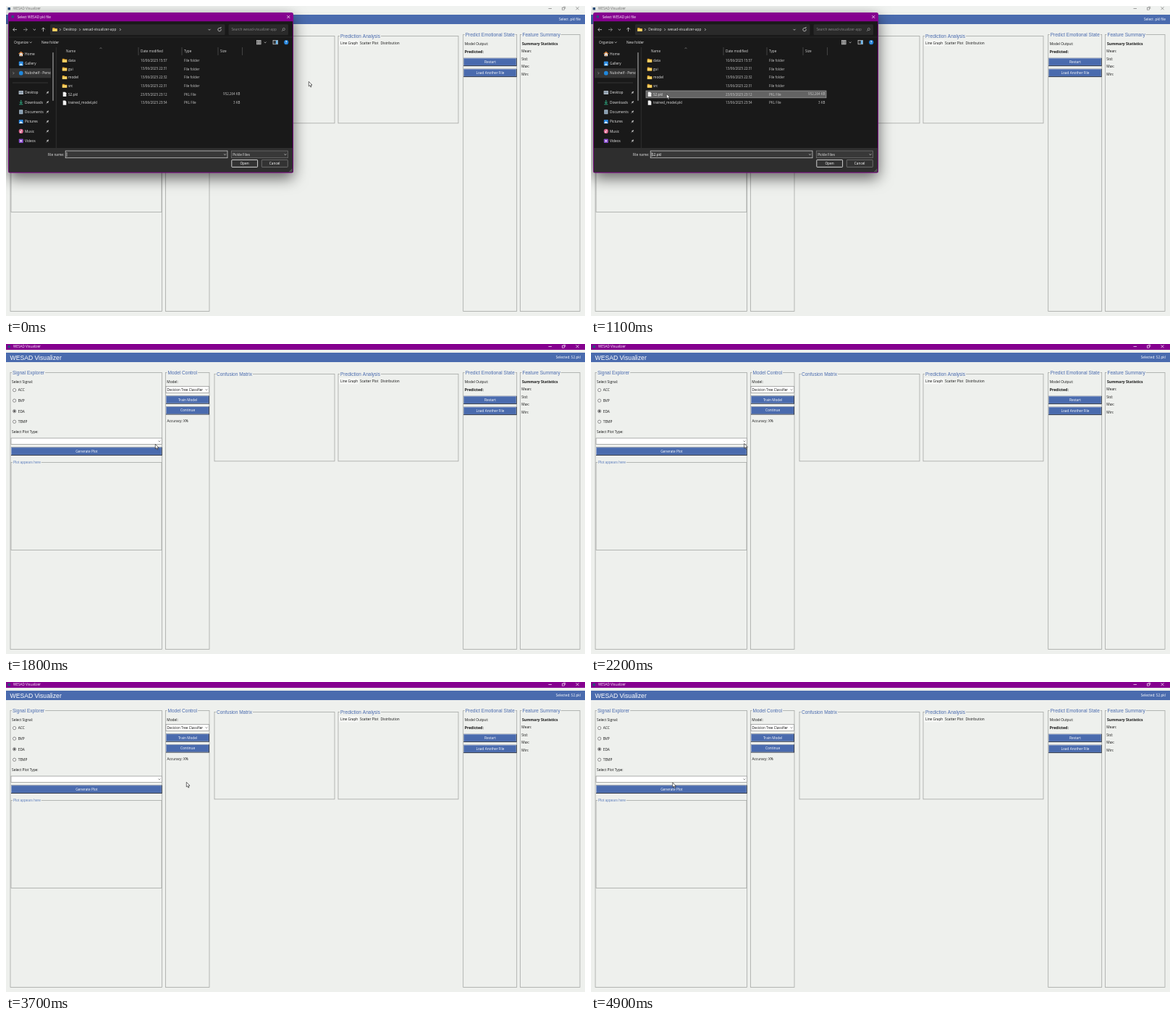
Animation, 800 px wide and 428 px high, one loop 5000 ms. Source, as an HTML page with a canvas:

```html
<!DOCTYPE html>
<html lang="en">
<head>
<meta charset="utf-8">
<style>
html, body { margin: 0; width: 100%; height: 100%; overflow: hidden; background: #eef0ed; }
canvas { display: block; width: 800px; height: 428px; }
</style>
</head>
<body>
<canvas width="800" height="428"></canvas>
<script>
const c = document.querySelector('canvas').getContext('2d');
const UI = '"Open Sans", sans-serif', ARIAL = '"Liberation Sans", Arial, sans-serif';
const BLUE = '#4a6bae', PURPLE = '#85008f', BG = '#eef0ed', INK = '#111';
const LOOP = 5000, STEP = 100, CLOSE_AT = 1200, HOVER_AT = 600, PICK_AT = 800, LOADED_AT = 1500;

// time, x, y of the pointer tip
const path = [[0, 418, 104], [100, 414, 104], [700, 108, 121], [1100, 104, 121], [1200, 109, 122],
  [1800, 206, 138], [2300, 212, 137], [2900, 240, 140], [3700, 249, 138],
  [4200, 160, 125], [4500, 90, 122], [4800, 110, 127], [4900, 112.5, 138.5]];

function box(x, y, w, h, fill, edge, lw = 0.7) {
  if (fill) { c.fillStyle = fill; c.fillRect(x, y, w, h); }
  if (edge) { c.strokeStyle = edge; c.lineWidth = lw; c.strokeRect(x, y, w, h); }
}
function round(x, y, w, h, r, fill, edge, lw = 0.7) {
  c.beginPath();
  c.roundRect(x, y, w, h, r);
  if (fill) { c.fillStyle = fill; c.fill(); }
  if (edge) { c.strokeStyle = edge; c.lineWidth = lw; c.stroke(); }
}
function dot(x, y, r, fill, edge) {
  c.beginPath();
  c.arc(x, y, r, 0, 7);
  if (fill) { c.fillStyle = fill; c.fill(); }
  if (edge) { c.strokeStyle = edge; c.lineWidth = 0.6; c.stroke(); }
}
function line(color, lw, ...p) {
  c.beginPath();
  for (let i = 0; i < p.length; i += 2) c.lineTo(p[i], p[i + 1]);
  c.strokeStyle = color; c.lineWidth = lw; c.stroke();
}
function shape(fill, ...p) {
  c.beginPath();
  for (let i = 0; i < p.length; i += 2) c.lineTo(p[i], p[i + 1]);
  c.closePath(); c.fillStyle = fill; c.fill();
}
// y is the middle of the text line
function text(s, x, y, color = INK, size = 4.85, align = 'left', font = UI, weight = '') {
  c.font = `${weight} ${size}px ${font}`;
  c.textAlign = align; c.fillStyle = color;
  c.fillText(s, x, y + size * 0.35);
}
const down = (x, y, color, r = 1.5) => line(color, 0.7, x - r, y - r / 2, x, y + r / 2, x + r, y - r / 2);
const right = (x, y, color) => line(color, 0.7, x - 0.7, y - 1.5, x + 0.8, y, x - 0.7, y + 1.5);
function cross(x, y, color) {
  line(color, 0.7, x - 2, y - 2, x + 2, y + 2);
  line(color, 0.7, x + 2, y - 2, x - 2, y + 2);
}
function group(title, x, y, w, h, size = 6.53, color = BLUE) {
  box(x, y, w, h, null, '#a5a7a5', 0.8);
  c.font = `${size}px ${ARIAL}`;
  box(x + 2, y - 2, c.measureText(title).width + 2, 4, BG);
  text(title, x + 3, y + 0.3, color, size, 'left', ARIAL);
}
function button(label, x, y, w, h) {
  box(x, y, w, h, '#1c2433');
  box(x, y, w - 0.8, h - 0.9, '#a9b8d6');
  box(x + 0.7, y + 0.7, w - 1.8, h - 1.9, BLUE);
  text(label, x + w / 2, y + h / 2 - 0.2, '#fff', 4.75, 'center');
}
function combo(value, x, y, w, h) {
  box(x, y, w, h, '#fff', '#8c8e8c');
  text(value, x + 1.5, y + h / 2, INK, 4.65);
  down(x + w - 3.5, y + h / 2, '#555', 1.4);
}

function mainWindow(t) {
  const active = t >= CLOSE_AT, tone = active ? '#fff' : '#777';
  box(0, 0, 800, 428, BG);
  box(0, 0, 800, 8, active ? PURPLE : '#f0f2f0');
  box(2.5, 2, 3.5, 3.5, '#2b4f7a');
  text('WESAD Visualizer', 10, 3.6, tone, 4.7);
  line(tone, 0.7, 749.5, 3.5, 754, 3.5);
  box(768.5, 2.2, 3, 3, null, tone, 0.6);
  line(tone, 0.6, 769.8, 1.2, 772.7, 1.2, 772.7, 4);
  cross(789.5, 3.3, tone);

  box(0, 12, 800, 13, BLUE);
  text('WESAD Visualizer', 5.5, 18.7, '#fff', 8.65, 'left', ARIAL);
  text(t < LOADED_AT ? 'Select .pkl file' : 'Selected: S2.pkl', 794, 18.6, '#fff', 4.75, 'right');

  group('Signal Explorer', 6, 39.5, 209.5, 382);
  text('Select Signal:', 8, 52.3);
  ['ACC', 'BVP', 'EDA', 'TEMP'].forEach((s, i) => {
    const y = 63.8 + i * 14.55;
    dot(11.6, y - 0.2, 2.1, '#fff', '#444');
    if (s === 'EDA') dot(11.6, y - 0.2, 1.1, '#111');
    text(s, 16.7, y);
  });
  text('Select Plot Type:', 8, 121.5);
  combo('', 7, 130, 208.5, 8.4);
  button('Generate Plot', 7, 142.5, 208.7, 11.5);
  group('Plot appears here', 7, 163.5, 208, 121, 4.8, '#5f7fbd');

  group('Model Control', 220.5, 39.5, 60.5, 382);
  text('Model:', 222.3, 52.3);
  combo('Decicion Tree Classifier', 221, 58.6, 59.5, 9);
  button('Train Model', 221, 71.5, 60, 11.2);
  button('Continue', 221, 86.3, 60, 11.2);
  text('Accuracy: X%', 222.5, 106);

  group('Confusion Matrix', 288, 41.5, 166, 120.3);
  group('Prediction Analysis', 459, 41.5, 166, 120.3);
  box(460, 46.5, 27.5, 9, '#f6f7f5');
  text('Line Graph', 462, 51, INK, 4.75);
  text('Scatter Plot', 489, 51.8, INK, 4.75);
  text('Distribution', 517.5, 51.8, INK, 4.75);

  group('Predict Emotional State', 631.7, 39.5, 74, 382);
  text('Model Output:', 633.7, 52.3);
  text('Predicted:', 633.7, 63.4, INK, 5.2, 'left', UI, 'bold');
  button('Restart', 632.2, 71.8, 73.5, 11.3);
  button('Load Another File', 632.2, 86.8, 73.5, 11.3);

  group('Feature Summary', 710.5, 39.5, 82.5, 382);
  text('Summary Statistics', 713, 52.4, INK, 5.15, 'left', UI, 'bold');
  ['Mean:', 'Std:', 'Max:', 'Min:'].forEach((s, i) => text(s, 712.3, 62.6 + i * 10.45));
}

function folder(x, y) {
  shape('#d99a25', x - 3.2, y - 2.5, x - 0.6, y - 2.5, x + 0.4, y - 1.6, x + 3.2, y - 1.6, x + 3.2, y + 2.5, x - 3.2, y + 2.5);
  box(x - 3.2, y - 1, 6.4, 3.5, '#f7d264');
}
function page(x, y) {
  shape('#f2f2f2', x - 2.3, y - 3.1, x + 0.9, y - 3.1, x + 2.3, y - 1.6, x + 2.3, y + 3.1, x - 2.3, y + 3.1);
}
function pin(x, y) {
  line('#bbb', 1.5, x - 0.8, y + 0.6, x + 1.2, y - 1.4);
  line('#bbb', 0.6, x - 1.2, y - 0.8, x + 1, y + 1.4);
  line('#bbb', 0.6, x - 2, y + 1.9, x, y);
}

const icons = {
  Home(x, y) {
    shape('#eee', x - 2.3, y, x, y - 2, x + 2.3, y, x + 2.3, y + 3, x - 2.3, y + 3);
    line('#e88a3a', 1.1, x - 3.2, y, x, y - 2.7, x + 3.2, y);
    box(x - 0.7, y + 1, 1.4, 2, '#d67d35');
  },
  Gallery(x, y) {
    round(x - 3, y - 3, 6, 6, 1, '#2f8de4');
    shape('#c6e6ff', x - 2.5, y + 2.5, x, y - 0.5, x + 2.5, y + 2.5);
  },
  Desktop(x, y) { round(x - 3.2, y - 2.5, 6.4, 5, 0.5, '#b9c3cd'); box(x - 2.6, y - 1.8, 5.2, 3, '#8a9aa9'); },
  Downloads(x, y) {
    line('#2fb58a', 1, x, y - 3, x, y + 1.5);
    line('#2fb58a', 1, x - 2, y - 0.3, x, y + 1.7, x + 2, y - 0.3);
    line('#2fb58a', 0.9, x - 2.6, y + 3, x + 2.6, y + 3);
  },
  Documents(x, y) {
    round(x - 2.6, y - 3, 5.2, 6, 0.5, '#a9bccd');
    for (const d of [-1.3, 0.2, 1.7]) line('#4d6780', 0.6, x - 1.6, y + d, x + 1.6, y + d);
  },
  Pictures(x, y) {
    round(x - 3, y - 2.6, 6, 5.4, 0.7, '#2a86de');
    shape('#e3f1ff', x - 2.7, y + 2.5, x - 0.3, y - 0.6, x + 2.7, y + 2.5);
  },
  Music(x, y) { dot(x, y, 3.1, '#d8638c'); dot(x - 0.6, y + 1, 0.9, '#fff'); line('#fff', 0.6, x + 0.2, y + 1, x + 0.2, y - 1.7, x + 1.3, y - 1); },
  Videos(x, y) { round(x - 3, y - 2.8, 6, 5.6, 0.7, '#8b4fd0'); shape('#fff', x - 1, y - 1.4, x + 1.6, y, x - 1, y + 1.4); }
};

function sidebar() {
  const tone = '#e6e6e6';
  box(5, 86, 57, 13.3, '#343434');
  right(10.2, 92.7, '#aaa');
  dot(20.8, 92.7, 2.9, '#1f87dc');
  c.save();
  c.beginPath(); c.rect(0, 80, 62, 20); c.clip();
  text('Nubshelf - Perso', 26, 92.6, tone, 4.8);
  c.restore();
  Object.keys(icons).forEach((name, i) => {
    const y = i < 2 ? 66.2 + i * 13.3 : 119.5 + (i - 2) * 13.35;
    icons[name](20.8, y);
    text(name, 26, y, tone, 4.8);
    if (i > 1) pin(57.5, y);
  });
  line('#444', 0.7, 9, 106, 58, 106);
  round(64.3, 64, 1.4, 67, 0.7, '#8c8c8c');
  line('#383838', 0.7, 69.3, 57, 69.3, 196);
}

function fileList(t) {
  const tone = '#e6e6e6', dim = '#c8c8c8';
  [['Name', 83], ['Date modified', 186], ['Type', 246], ['Size', 296]].forEach(([s, x]) => text(s, x, 62.6, '#ddd', 4.65));
  for (const x of [183, 243, 293, 326.5]) line('#555', 0.7, x, 57, x, 68);
  line('#999', 0.6, 129.5, 58.7, 131, 57.7, 132.5, 58.7);
  if (t >= PICK_AT) box(76, 117, 249, 9.8, '#636363', '#a0a0a0');
  else if (t >= HOVER_AT) box(76, 117, 249, 9.8, '#454545');
  [['data', '10/06/2025 15:57'], ['gui', '13/06/2025 22:31'], ['model', '13/06/2025 22:32'],
    ['src', '13/06/2025 22:31'], ['S2.pkl', '23/05/2025 23:12', '952,264 KB'],
    ['trained_model.pkl', '13/06/2025 23:54', '3 KB']].forEach(([name, date, size], i) => {
    const y = 75.2 + i * 11.68;
    (size ? page : folder)(81, y);
    text(name, 86, y, tone, 4.75);
    text(date, 186, y, dim, 4.52);
    text(size ? 'PKL File' : 'File folder', 246, y, dim, 4.65);
    if (size) text(size, 323.5, y, dim, 4.5, 'right');
  });
}

function dialog(t) {
  const tone = '#e6e6e6', dim = '#aaa';
  c.save();
  c.shadowColor = 'rgba(0,0,0,.6)'; c.shadowBlur = 20; c.shadowOffsetY = 7;
  round(3, 9, 394, 221.5, 2.5, PURPLE);
  c.restore();
  box(3.8, 21.2, 392.4, 175, '#191919');
  box(3.8, 196, 392.4, 33.6, '#2e2e2e');
  box(7.5, 13, 3.5, 3.5, '#2b4f7a');
  text('Select WESAD pkl file', 15.7, 15.2, '#fff', 4.75);
  cross(390.3, 15, '#fff');

  line(tone, 0.7, 15, 32.6, 9.7, 32.6);
  line(tone, 0.7, 12, 30.3, 9.7, 32.6, 12, 34.9);
  line(dim, 0.7, 24, 32.6, 29.3, 32.6);
  line(dim, 0.7, 27, 30.3, 29.3, 32.6, 27, 34.9);
  down(39.3, 32.6, tone, 1.7);
  line(tone, 0.7, 51.5, 35.3, 51.5, 30);
  line(tone, 0.7, 49.2, 32.3, 51.5, 30, 53.8, 32.3);
  round(61, 25.3, 241.5, 14.6, 1.5, '#2a2a2a');
  folder(67.5, 32.5);
  right(74.8, 32.6, tone);
  text('Desktop', 79.3, 32.6, tone, 4.75);
  right(102, 32.6, tone);
  text('wesad-visualizer-app', 106, 32.6, tone, 4.75);
  right(157.8, 32.6, tone);
  down(281, 32.6, tone);
  c.beginPath(); c.arc(295, 32.6, 2.2, -0.3, 5); c.strokeStyle = tone; c.lineWidth = 0.7; c.stroke();
  line(tone, 0.7, 295.3, 30.4, 297, 30.4, 297, 28.9);
  round(307.5, 25.3, 82.5, 14.6, 1.5, '#2a2a2a');
  text('Search wesad-visualizer-app', 311.5, 32.6, '#858585', 4.75);
  dot(383.8, 32, 1.6, null, dim);
  line(dim, 0.7, 382.6, 33.2, 381, 34.9);

  line('#303030', 0.6, 4, 43, 396, 43);
  text('Organize', 11, 50.2, tone, 4.75);
  down(34.2, 50.2, tone, 1.4);
  text('New folder', 49, 50.2, tone, 4.75);
  box(346.5, 47.5, 5.6, 5.4, '#777', '#ddd', 0.6);
  line('#ddd', 0.6, 349.3, 47.5, 349.3, 53);
  down(358.2, 50.3, tone, 1.3);
  box(369, 47.4, 6.5, 5.4, '#333', '#eee', 0.6);
  box(372.8, 47.6, 2.5, 5, '#6bb8f0');
  dot(387.2, 50.2, 3.1, '#2080d8');
  text('?', 387.2, 50.2, '#fff', 4.8, 'center', UI, 'bold');

  sidebar();
  fileList(t);

  text('File name:', 80.3, 205, tone, 4.75, 'right');
  box(82.2, 200, 223.8, 9.7, '#383838', '#c8c8c8', 0.8);
  if (t >= PICK_AT) text('S2.pkl', 84, 205, '#fff', 4.75);
  line('#eee', 0.6, 84, 202, 84, 208);
  down(302.5, 205, tone, 1.4);
  box(311.3, 200, 78.2, 9.7, '#383838', '#777');
  text('Pickle Files', 313.2, 205, tone, 4.75);
  down(386, 205, tone, 1.4);
  round(311.8, 212.4, 35.8, 10, 0.7, '#333', '#e4e4e4', 0.9);
  text('Open', 329.5, 217.3, '#fff', 4.75, 'center');
  round(353.3, 212.4, 36, 10, 0.7, '#333', '#858585');
  text('Cancel', 371.2, 217.3, '#fff', 4.75, 'center');
  for (const d of [2, 4]) line('#999', 0.6, 395.5 - d, 229, 395.5, 229 - d);
}

function pointer(t) {
  const i = Math.max(1, path.findIndex(p => p[0] >= t));
  const [t0, x0, y0] = path[i - 1], [t1, x1, y1] = path[i];
  const u = (t - t0) / (t1 - t0), k = u * u * (3 - 2 * u);
  c.save();
  c.translate(x0 + (x1 - x0) * k, y0 + (y1 - y0) * k);
  const p = new Path2D('M.3.3V6.8L1.8 5.5 2.9 8 4 7.5 3 5.1H5Z');
  c.fillStyle = '#fff'; c.fill(p);
  c.strokeStyle = '#222'; c.lineWidth = 0.65; c.stroke(p);
  c.restore();
}

function draw(now) {
  const t = Math.floor(now % LOOP / STEP) * STEP;
  mainWindow(t);
  if (t < CLOSE_AT) dialog(t);
  pointer(t);
}
const start = performance.now();
function tick() {
  draw(performance.now() - start);
  requestAnimationFrame(tick);
}
tick();
</script>
</body>
</html>
```
